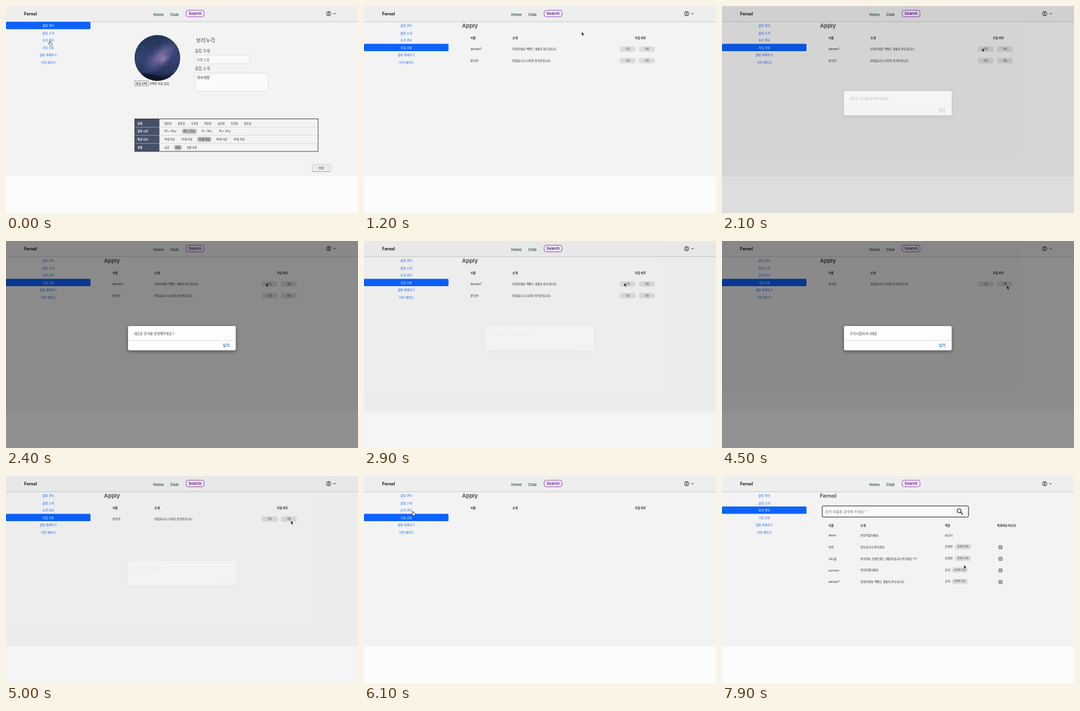
Write an HTML page that moves like this. It is 600 px wide and 353 px high and loops after 8 s.

```html
<!DOCTYPE html>
<html lang="ko">
<head>
<meta charset="utf-8">
<style>
html, body { margin: 0; width: 100%; height: 100%; overflow: hidden; background: #fcfcfc; }
svg { display: block; width: 600px; height: 353px; }
text { font-family: Inter, "Noto Sans CJK KR", "Noto Sans CJK", "Noto Sans", sans-serif; white-space: pre; }
</style>
</head>
<body>
<svg id="stage" viewBox="0 0 600 353">
  <defs>
    <linearGradient id="sky" x2="0" y2="1">
      <stop offset="0" stop-color="#1f3354"/><stop offset=".5" stop-color="#34426f"/>
      <stop offset=".8" stop-color="#27365c"/><stop offset="1" stop-color="#0d1425"/>
    </linearGradient>
    <radialGradient id="glow">
      <stop offset="0" stop-color="#a08ab4" stop-opacity=".85"/>
      <stop offset=".5" stop-color="#6c629a" stop-opacity=".55"/>
      <stop offset="1" stop-color="#4a4f86" stop-opacity="0"/>
    </radialGradient>
    <linearGradient id="edge" x2="0" y2="1">
      <stop offset="0" stop-color="#cfcfcf"/><stop offset="1" stop-color="#f3f3f3"/>
    </linearGradient>
    <clipPath id="round"><circle cx="258" cy="88.5" r="39"/></clipPath>
    <filter id="soft" x="-10%" y="-30%" width="120%" height="170%">
      <feDropShadow dx="0" dy="2" stdDeviation="3" flood-opacity=".45"/>
    </filter>
  </defs>
</svg>
<script>
const stage = document.getElementById('stage');
const BRAND = 'Fernol';

// Text is placed by its vertical centre.
const text = (s, x, y, size = 4.8, fill = '#222', weight = 400, anchor = 'start') =>
  `<text x="${x}" y="${y + size * .36}" font-size="${size}" fill="${fill}" font-weight="${weight}" text-anchor="${anchor}">${s}</text>`;
const bold = (s, x, y, size = 4.8, fill = '#222') => text(s, x, y, size, fill, 700);
const mid = (s, x, y, size, fill, weight) => text(s, x, y, size, fill, weight, 'middle');
const rect = (x, y, w, h, fill, rx = 0, stroke = 'none', sw = .6) =>
  `<rect x="${x}" y="${y}" width="${w}" height="${h}" rx="${rx}" fill="${fill}" stroke="${stroke}" stroke-width="${sw}"/>`;
const path = (d, stroke, sw = 1, fill = 'none') =>
  `<path d="${d}" fill="${fill}" stroke="${stroke}" stroke-width="${sw}" stroke-linejoin="round"/>`;
const pill = (s, x, y) => rect(x, y - 4.6, 27, 9.2, '#dcdcdc', 3.5) + mid(s, x + 13.5, y, 4, '#333');

function add(html) {
  const g = document.createElementNS('http://www.w3.org/2000/svg', 'g');
  g.innerHTML = html;
  stage.append(g);
  return g;
}
const show = (g, on) => g.setAttribute('display', on ? 'inline' : 'none');

function header() {
  return rect(0, 0, 600, 290.5, '#f3f3f3') + rect(0, 0, 600, 26.5, '#eeeeee') +
    rect(0, 26, 600, 2.5, 'url(#edge)') +
    bold(BRAND, 31, 13, 7, '#111') +
    bold('Home', 251, 14.4, 6.3, '#416b59') + bold('Club', 280, 14.4, 6.3, '#416b59') +
    rect(307, 7.2, 30.6, 11.2, '#f3edf7', 3.5, '#9440bd', .9) +
    mid('Search', 322.2, 12.9, 6.4, '#64209b', 700) +
    '<circle cx="550" cy="13" r="3.8" fill="none" stroke="#222" stroke-width=".8"/>' +
    '<circle cx="550" cy="11.8" r="1.3" fill="none" stroke="#222" stroke-width=".8"/>' +
    path('M547.4 15.6Q550 13.6 552.6 15.6', '#222', .8) + path('M558 12l2 2 2-2', '#222', .9);
}

function sidebar(active) {
  const items = ['클럽 관리', '클럽 소개', '유저 관리', '가입 신청', '클럽 해체하기', '이전 페이지'];
  return rect(0, 27 + active * 12.5, 144, 12.4, '#0d62fb', 1.5) +
    items.map((s, i) => mid(s, 72, 33.2 + i * 12.5, 5, i === active ? '#fff' : '#1a6cf5')).join('');
}

function photo() {
  let seed = 7, stars = '';
  const rnd = () => (seed = seed * 16807 % 2147483647) / 2147483647;
  for (let i = 0; i < 170; i++) {
    stars += `<circle cx="${219 + rnd() * 78}" cy="${49 + rnd() * 70}" r="${.15 + rnd() * .35}" fill="#c9d2f0" opacity="${.3 + rnd() * .6}"/>`;
  }
  return `<g clip-path="url(#round)">${rect(219, 49, 78, 79, 'url(#sky)')}
    <ellipse cx="264" cy="86" rx="42" ry="19" fill="url(#glow)" transform="rotate(-42 264 86)"/>
    <ellipse cx="268" cy="91" rx="17" ry="10" fill="url(#glow)" transform="rotate(-42 268 91)"/>
    ${stars}${path('M219 118Q240 113 258 119T297 116V128H219Z', 'none', 0, '#10172a')}</g>`;
}

function schedule() {
  const rows = [
    ['날짜', [270, 292.8, 315.4, 338, 360.6, 383.2, 405.8], ['월요일', '화요일', '수요일', '목요일', '금요일', '토요일', '일요일']],
    ['활동 시간', [270, 302.5, 333, 363.5], ['00 ~ 06시', '06 ~ 12시', '12 ~ 18시', '16 ~ 24시'], 1, 25],
    ['평균 나이', [270, 299, 328.5, 358, 388], ['10세 이상', '20세 이상', '30세 이상', '40세 이상', '50세 이상'], 2, 24],
    ['성별', [270, 289, 308], ['남성', '여성', '성별 무관'], 1, 13]
  ];
  return rect(219.5, 192.5, 312.5, 55.5, '#f3f3f3') + rect(219.5, 192.5, 42, 55.5, '#465069') +
    rows.map(([name, xs, labels, pick, w], i) => {
      const y = 200 + i * 13.75;
      return (i ? path(`M219.5 ${y - 6.9}H532`, '#c9c9c9', .6) : '') + bold(name, 224, y, 4.6, '#fff') +
        (pick ? rect(xs[pick] - 2.4, y - 4.3, w, 8.6, '#b9b9b9', 3.5) : '') +
        labels.map((s, k) => text(s, xs[k], y, 4.4)).join('');
    }).join('') + rect(219.5, 192.5, 312.5, 55.5, 'none', 0, '#333', .9);
}

function managePage() {
  return photo() + rect(219.3, 127.4, 23, 8.8, '#ededed', 0, '#777') + mid('파일 선택', 230.8, 131.8, 4.8) +
    text('선택된 파일 없음', 244.5, 131.8, 4.8) +
    text('보리누각', 324, 59, 8.8, '#444') +
    text('클럽 주제', 322, 76.5, 6.4, '#555') + rect(322.4, 84, 93, 14.5, '#fafafa', 3, '#d2d2d2') +
    text('찐빵고을', 325, 91.5, 6.1, '#777') +
    text('클럽 소개', 322, 106.5, 6.4, '#555') + rect(322.4, 114.4, 124.6, 30.8, '#fafafa', 3, '#d2d2d2') +
    text('국수대장', 325, 122, 6.1, '#222') +
    schedule() + rect(522, 270.3, 31, 12, '#ebebeb', .8, '#bbb') +
    path('M522 282.5H553', '#999', .7) + mid('완료', 537.5, 276.2, 4.8);
}

const applicants = [
  ['qwope7', '안녕하세요 백엔드 개발자 만두입니다.'],
  ['문가온', '반갑습니다 디자인 문가온입니다.']
];

const applyHead = () => text('Apply', 167, 34, 9.4, '#555', 700) +
  bold('이름', 181.5, 54.7) + bold('소개', 253, 54.7) + mid('가입 여부', 471, 54.7, 4.8, '#222', 700);

const applyRow = ([name, intro], y) =>
  text(name, 181.5, y, 5) + text(intro, 253, y) + pill('가입', 435.8, y) + pill('거절', 468.6, y);

function usersPage() {
  const users = [
    ['demo', '본인어필하세요', '마스터'],
    ['하이', '만두입니다 반가워요', '운영진'],
    ['서다울', '반가워요 프론트엔드 개발자입니다 반가워요 ! !!!', '운영진'],
    ['zxcnmv', '본인어필하세요', '유저'],
    ['qwope7', '안녕하세요 백엔드 개발자 만두입니다.', '유저']
  ];
  return bold(BRAND, 167, 34, 9.1, '#555') +
    rect(170.8, 51, 249.4, 19, '#f5f5f5', 2, '#222', 1) + rect(172.5, 52.5, 217.5, 16, '#fafafa') +
    text('유저 이름을 검색해 주세요 !', 176, 60.7, 6, '#777') +
    '<circle cx="404.2" cy="59.2" r="3.2" fill="none" stroke="#222" stroke-width="1.1"/>' + path('M406.6 61.6l3.8 3.8', '#222', 1.4) +
    bold('이름', 181.5, 84) + bold('소개', 236, 84) + bold('역할', 380, 84) + bold('죽일까요 마스터', 469, 84) +
    users.map(([name, intro, role], i) => {
      const y = 101.5 + i * 19.75, staff = role === '운영진';
      const tools = i ? pill(staff ? '유저로 강등' : '운영진 승급', staff ? 397.4 : 391.8, y - .6) +
        rect(472, y - 2.4, 5.4, 5.4, 'none', .7, '#222', .8) +
        path(`M473.5 ${y - .9}l2.4 2.4m0-2.4l-2.4 2.4`, '#222', .8) : '';
      return text(name, 181.5, y, 5) + text(intro, 236, y) + text(role, 380, i ? y - .8 : y) + tools;
    }).join('');
}

const dialog = message => add(rect(0, 0, 600, 353, '#000" fill-opacity=".43') +
  `<g filter="url(#soft)">${rect(208, 145, 183.5, 41.3, '#fdfdfd', 2.5)}</g>` +
  path('M208 169.8H391.5', '#d2d2d2', .7) + text(message, 218, 157.6, 5.6, '#444') + bold('닫기', 370, 178, 6, '#1670f0'));

add(header());
const manage = add(sidebar(0) + managePage());
const apply = add(sidebar(3) + applyHead());
const bothRows = add(applyRow(applicants[0], 73.4) + applyRow(applicants[1], 93.2));
const lastRow = add(applyRow(applicants[1], 73.4));
const users = add(sidebar(2) + usersPage());
const welcome = dialog('새로운 유저를 환영해주세요 !');
const refuse = dialog('우리사람이아니에요');
const arrow = add(path('M0 0V6.4L1.5 5.1L2.6 7.6L3.8 7.1L2.7 4.7H4.7Z', '#fff', .5, '#111'));
const hand = add(path('M1.3 .3Q2.2-.2 2.4 .8V3L5 3.5Q6 3.8 5.8 5L5.2 7.7H2L.1 5Q-.5 4 .5 4L1.3 4.6Z', '#222', .7, '#fff'));

// Pointer track: time, x, y
const track = [
  [0, 72.8, 59.5], [600, 71, 69], [700, 71, 69], [1200, 371, 44], [2000, 443.3, 71.3],
  [3200, 443.3, 71.3], [3500, 464, 81], [3800, 485.6, 76], [5300, 485.6, 76], [6100, 81.5, 59.8],
  [6300, 81.5, 59.8], [7000, 428, 124.5], [7200, 428, 124.5], [7900, 412.4, 151.6]
];

function pointer(t) {
  const i = Math.max(1, track.findIndex(k => k[0] >= t));
  const [t0, x0, y0] = track[i - 1], [t1, x1, y1] = track[i];
  const p = (t - t0) / (t1 - t0), e = p * p * (3 - 2 * p);
  return [x0 + (x1 - x0) * e, y0 + (y1 - y0) * e];
}

function fade(g, t, open, close) {
  const clamp = v => Math.min(1, Math.max(0, v));
  const rise = 1 - (1 - clamp((t - open) / 250)) ** 2;
  const o = Math.min(rise, 1 - clamp((t - close) / 200));
  g.setAttribute('opacity', o);
  show(g, o > 0);
}

function draw(now) {
  const t = Math.floor(now % 8000 / 100) * 100; // ten pictures a second
  show(manage, t < 800);
  show(apply, t >= 800 && t < 6300);
  show(bothRows, t >= 800 && t < 3000);
  show(lastRow, t >= 3000 && t < 5100);
  show(users, t >= 6300);
  fade(welcome, t, 2060, 2712);
  fade(refuse, t, 4260, 4812);
  const [x, y] = pointer(t), overMenu = x < 144 && y > 27 && y < 102;
  for (const c of [arrow, hand]) c.setAttribute('transform', `translate(${x} ${y})`);
  show(hand, overMenu);
  show(arrow, !overMenu);
  // The page cursor lies beneath the dim layer of an open dialog.
  requestAnimationFrame(draw);
}
stage.insertBefore(arrow, welcome);
stage.insertBefore(hand, welcome);
requestAnimationFrame(draw);
</script>
</body>
</html>
```
